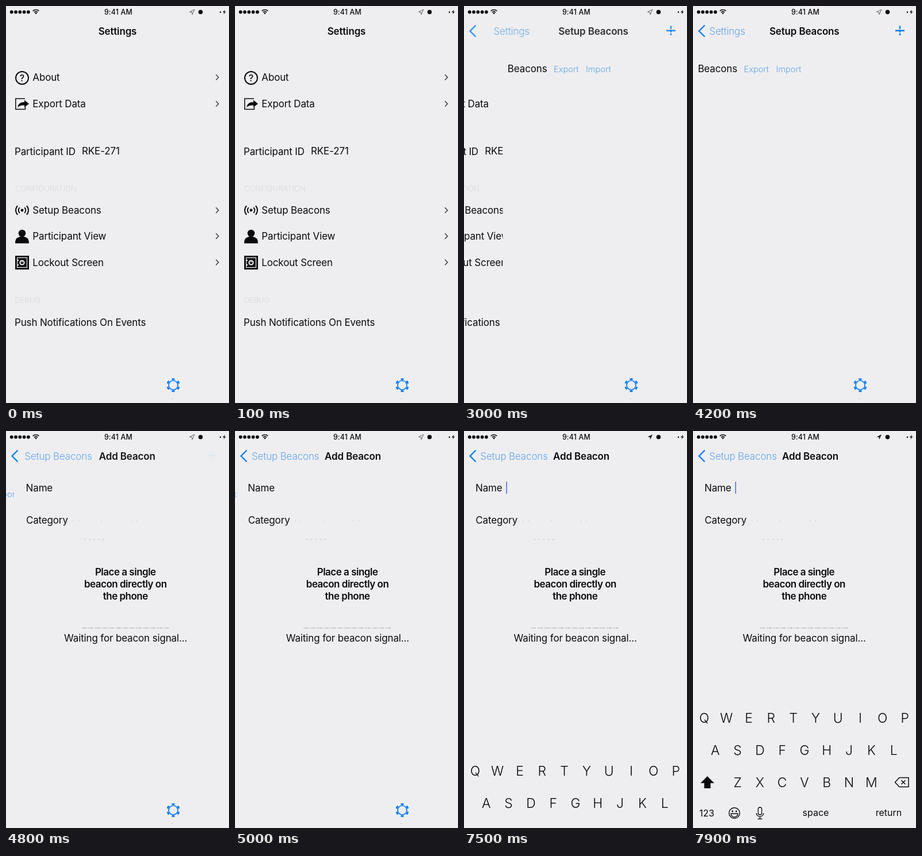
These frames come from a looping animation (388x690 px, 8 s). An HTML page with a canvas:

```html
<!DOCTYPE html>
<html lang="en">
<head>
<meta charset="utf-8">
<title>Beacon setup</title>
<style>
html, body { margin: 0; width: 100%; height: 100%; overflow: hidden; background: #eeeef0; }
canvas { display: block; width: 388px; height: 690px; }
</style>
</head>
<body>
<canvas id="stage"></canvas>
<script>
const W = 388, H = 690, LOOP = 8000, STEP = 100;
const BG = '#eeeef0', INK = '#0b0b0d', BLUE = '#0a7cf4', PALE = '#62a4e8';
const canvas = document.getElementById('stage');
const dpr = window.devicePixelRatio || 1;
canvas.width = W * dpr;
canvas.height = H * dpr;
const c = canvas.getContext('2d');

function text(str, x, y, o = {}) {
  const { size = 17, weight = 400, color = INK, align = 'left', gap = -0.15 } = o;
  c.font = `${weight} ${size}px Inter, sans-serif`;
  c.letterSpacing = gap + 'px';
  c.textAlign = align;
  c.fillStyle = color;
  c.fillText(str, x, y);
}

function line(points, width, color = INK, close = false) {
  c.beginPath();
  points.forEach(([x, y]) => c.lineTo(x, y));
  if (close) c.closePath();
  c.lineWidth = width;
  c.strokeStyle = color;
  c.stroke();
}

function fill(points, color = INK) {
  c.beginPath();
  points.forEach(([x, y]) => c.lineTo(x, y));
  c.fillStyle = color;
  c.fill();
}

function dot(x, y, r, color = INK) {
  c.beginPath();
  c.arc(x, y, r, 0, 7);
  c.fillStyle = color;
  c.fill();
}

function arc(x, y, r, a, b, width, color = INK) {
  c.beginPath();
  c.arc(x, y, r, a, b);
  c.lineWidth = width;
  c.strokeStyle = color;
  c.stroke();
}

function rect(x, y, w, h, color = INK) {
  c.fillStyle = color;
  c.fillRect(x, y, w, h);
}

function layer(dx, dy, alpha, draw) {
  if (alpha <= 0) return;
  c.save();
  c.translate(dx, dy);
  c.globalAlpha *= alpha;
  draw();
  c.restore();
}

// Remaining part (1 to 0) of a critically damped move begun at `start`
function left(t, start) {
  const k = Math.max(0, t - start) * 0.0106;
  return (1 + k) * Math.exp(-k);
}

function statusBar(t) {
  for (let i = 0; i < 5; i++) dot(9.7 + i * 7.3, 10.5, 2.9);
  for (const r of [4.6, 8]) arc(52, 14.5, r, -2.3, -0.84, 1.6);
  fill([[52, 14.6], [50, 12.2], [52, 11.4], [54, 12.2]]);
  text('9:41 AM', 195.4, 15, { size: 12.4, weight: 500, align: 'center', gap: 0.15 });
  const arrow = [[328, 6], [319.5, 10.3], [323.6, 10.8], [324, 15]];
  if (t >= 6300) fill(arrow);
  else line(arrow, 0.9, '#555', true);
  dot(338.5, 10.5, 3.8);
  rect(372, 9.5, 2, 2.5);
  fill([[381, 6.5], [377, 11], [379.6, 11], [378.5, 14.5], [382.5, 9.8], [380, 9.8]]);
}

function tabBar() {
  const x = 291, y = 659;
  arc(x, y, 8, 0, 7, 1.7, BLUE);
  for (let i = 0; i < 6; i++) {
    const a = Math.PI * (i / 3 + 0.5);
    arc(x, y, 10.4, a - 0.24, a + 0.24, 3, BLUE);
  }
  rect(289, 682, 1, 1, '#888');
}

function icons() {
  arc(28, 125, 11, 0, 7, 2);
  text('?', 28, 130.8, { size: 16, weight: 500, align: 'center', gap: 0 });

  line([[33, 161], [16.8, 161], [16.8, 179.4], [33.5, 179.4], [33.5, 175]], 1.5);
  c.beginPath();
  c.moveTo(20, 176.5);
  c.quadraticCurveTo(21, 167, 32, 167);
  c.lineTo(32, 163.5);
  c.lineTo(40, 170);
  c.lineTo(32, 176);
  c.lineTo(32, 172.5);
  c.quadraticCurveTo(24, 172, 20, 176.5);
  c.fillStyle = INK;
  c.fill();

  dot(28, 355, 2.4);
  for (const [r, s] of [[6.3, 0.85], [11, 0.78]]) {
    arc(28, 355, r, -s, s, 1.9);
    arc(28, 355, r, Math.PI - s, Math.PI + s, 1.9);
  }

  dot(28, 395, 6.3);
  c.beginPath();
  c.moveTo(16, 412.5);
  c.bezierCurveTo(16, 404, 19, 403, 24, 401);
  c.lineTo(32, 401);
  c.bezierCurveTo(37, 403, 40, 404, 40, 412.5);
  c.fill();

  rect(16, 434, 24, 24);
  c.lineWidth = 1.2;
  c.strokeStyle = BG;
  c.strokeRect(19.5, 437.5, 17, 17);
  dot(28, 446, 4.6, BG);
  dot(28, 446, 2.5);
  rect(27.4, 443, 1.2, 3, BG);
  rect(20, 441, 2, 2, BG);
  rect(20, 449, 2, 2, BG);
}

function settings() {
  icons();
  const rows = [['About', 124], ['Export Data', 170], ['Setup Beacons', 355],
    ['Participant View', 400], ['Lockout Screen', 445.5]];
  for (const [label, y] of rows) {
    text(label, 46.3, y + 6);
    line([[365.3, y - 4.8], [369.8, y], [365.3, y + 4.8]], 1.5, '#3c3c40');
  }
  text('Participant ID', 15, 258.5);
  text('RKE-271', 132, 257.5);
  text('Push Notifications On Events', 15, 555.5);
  const faint = { size: 13, weight: 300, color: '#d9d9dc', gap: 0 };
  text('CONFIGURATION', 16, 322, faint);
  text('DEBUG', 15.5, 516, faint);
}

function beacons() {
  text('Beacons', 8.4, 115);
  const link = { size: 14.6, weight: 300, color: PALE, gap: 0 };
  text('Export', 88.5, 115, link);
  text('Import', 144.5, 115, link);
}

function form(t) {
  text('Name', 20, 104.5);
  text('Category', 20.3, 160.5);
  ['Place a single', 'beacon directly on', 'the phone'].forEach((s, i) =>
    text(s, 193.2, 251 + i * 21, { weight: 600, align: 'center', gap: -0.5 }));
  text('Waiting for beacon signal...', 86.5, 366);
  for (let x = 122; x < 162; x += 8) rect(x, 188, 1.5, 1, '#a5a5a9');
  c.setLineDash([2, 1, 5, 2, 1, 1]);
  line([[117, 342.5], [271, 342.5]], 1, '#a0a0a4');
  c.setLineDash([]);
  for (const x of [102, 112, 151, 203, 212]) rect(x, 156, 1, 1, '#aaa');
  if (t >= 7300) rect(73.5, 88, 1.4, 21, '#3d63d2');
}

function backLabel(str, x, alpha) {
  layer(x, 0, alpha, () => text(str, 28.3, 49.5, { weight: 300, color: PALE }));
}

function title(str, x, alpha) {
  layer(x, 0, alpha, () => text(str, 0, 49.5, { weight: 600, align: 'center' }));
}

function backArrow(alpha) {
  layer(0, 0, alpha, () => line([[20.5, 33.5], [10.5, 43.5], [20.5, 53.5]], 2.4, BLUE));
}

function plus(alpha) {
  layer(0, 0, alpha, () => {
    rect(352, 41.5, 16, 2.6, BLUE);
    rect(358.8, 34.5, 2.4, 5.5, BLUE);
    rect(358.8, 41.5, 2.4, 4.5, BLUE);
    rect(358.8, 47.5, 2.4, 3.5, BLUE);
  });
}

const screens = [
  { name: 'Settings', x: 194, width: 64, draw: settings },
  { name: 'Setup Beacons', x: 193.7, width: 119, back: 'Settings', draw: beacons, plus: true },
  { name: 'Add Beacon', x: 204, back: 'Setup Beacons', draw: form }
];

function push(from, to, s, t) {
  if (s > 0.002) layer(-116 * (1 - s), 0, 1, () => from.draw(t));
  layer(W * s, 0, 1, () => {
    rect(0, 64, W, H - 64, BG);
    to.draw(t);
  });
  rect(0, 0, W, 64, BG);
  const mid = 29 + from.width / 2, shift = (from.x - mid) * s;
  title(from.name, mid + shift, s * s);
  backLabel(to.back, shift, 1 - s);
  title(to.name, to.x + 180 * s, 1 - s);
  if (from.back) backLabel(from.back, -90 * (1 - s), s * s);
  backArrow(from.back ? 1 : 1 - s);
  if (from.plus) plus(s > 0.02 ? s : 0);
  if (to.plus) plus(1 - s);
}

function keyboard() {
  rect(0, 466, W, 240, BG);
  ['QWERTYUIOP', 'ASDFGHJKL', 'ZXCVBNM'].forEach((row, r) =>
    [...row].forEach((key, i) =>
      text(key, 38.8 * (i + r + (r ? 0 : 0.5)), 507.3 + r * 55.8,
        { size: 23, weight: 300, align: 'center', gap: 0 })));

  fill([[25, 600], [37, 612], [30.5, 612], [30.5, 621], [19.5, 621], [19.5, 612], [13, 612]]);
  line([[351.5, 610.5], [359, 602.5], [375, 602.5], [375, 618.5], [359, 618.5]], 1.5, INK, true);
  line([[362.5, 607], [369.5, 614]], 1.5);
  line([[369.5, 607], [362.5, 614]], 1.5);

  const small = { size: 16, align: 'center', gap: 0 };
  text('123', 24, 670, small);
  text('space', 213.5, 669, small);
  text('return', 340.5, 669, small);

  arc(72, 664, 9.3, 0, 7, 1.4);
  dot(68.7, 661, 1.4);
  dot(75.3, 661, 1.4);
  c.beginPath();
  c.arc(72, 665, 6, 0, Math.PI);
  c.closePath();
  c.lineWidth = 1.3;
  c.stroke();

  c.beginPath();
  c.roundRect(113.4, 654, 6.2, 13, 3.1);
  c.stroke();
  arc(116.5, 664, 6.2, 0, Math.PI, 1.3);
  line([[116.5, 670], [116.5, 674]], 1.3);
  line([[112.5, 674.3], [120.5, 674.3]], 1.3);
}

function render(t) {
  c.setTransform(dpr, 0, 0, dpr, 0, 0);
  c.globalAlpha = 1;
  rect(0, 0, W, H, BG);
  if (t <= 2700) {
    settings();
    title('Settings', 194, 1);
  } else if (t <= 4300) {
    push(screens[0], screens[1], t >= 3400 ? 0 : left(t, 2700), t);
  } else {
    push(screens[1], screens[2], t >= 5500 ? 0 : left(t, 4320), t);
  }
  tabBar();
  statusBar(t);
  if (t > 7316) layer(0, Math.round(227 * left(t, 7316) - 3), 1, keyboard);
}

function tick(now) {
  render(Math.floor(now % LOOP / STEP) * STEP);
  requestAnimationFrame(tick);
}
requestAnimationFrame(tick);
</script>
</body>
</html>
```
